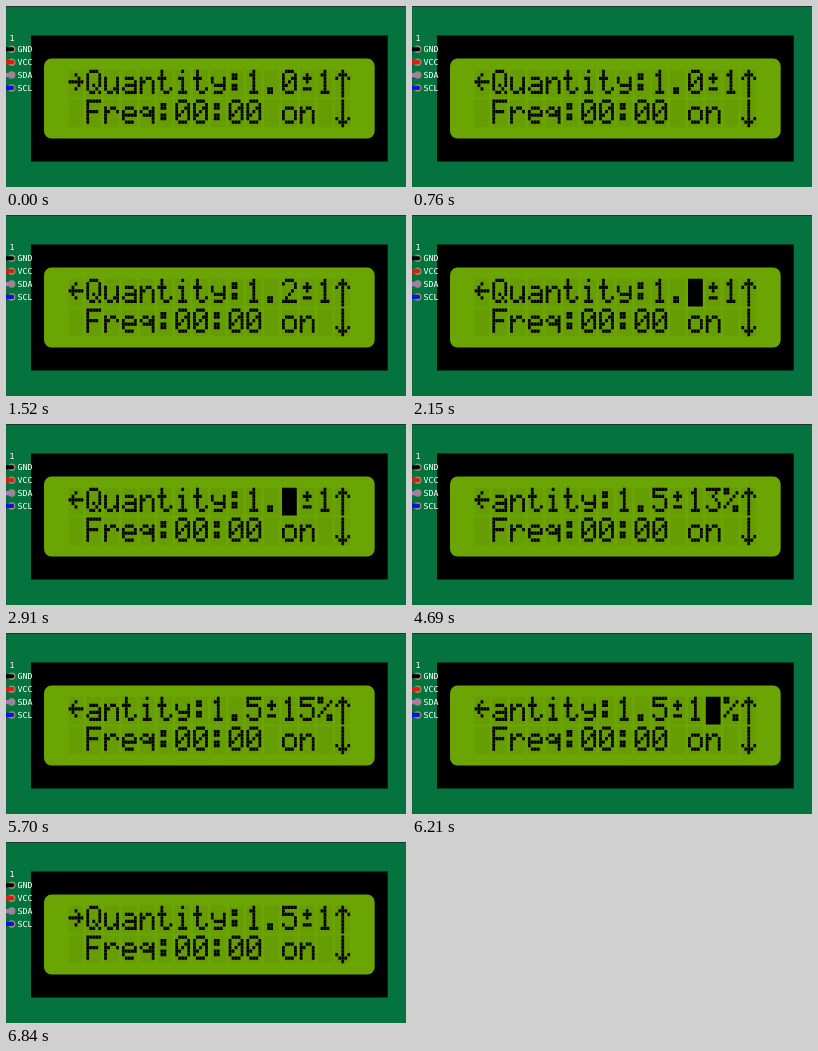
An HTML page with a canvas that plays this animation: 400x181 px, repeating every 6.97 s.

```html
<!DOCTYPE html>
<html>
<head>
<meta charset="utf-8">
<style>
  html, body { margin: 0; height: 100%; overflow: hidden; background: #1c3a2b; }
  canvas { display: block; }
</style>
</head>
<body>
<canvas id="stage" width="400" height="181"></canvas>
<script>
const ctx = document.getElementById('stage').getContext('2d');
const LOOP = 6970, STEP = LOOP / 55;

// Pen strokes on the 5x8 dot grid: each word is a polyline of xy pairs.
const STROKES = {
  Q: '2616050110304144 2446', u: '0205162635 4246', a: '1232434616051444',
  n: '0206 1322324346', t: '1015263645 0222', i: '20 122226 1636',
  y: '02031444 42453616', F: '400006 0333', r: '0206 13223243',
  e: '361605031232434404', q: '4246 332212031444', o: '120305163645433212',
  0: '160501103041453616 3214', 1: '112026 1636', 2: '01103041420646',
  3: '0040224445361605', 4: '3630030444', 5: '400002324345361605',
  ':': '11212212 14242515', '.': '15252616', '%': '00101101 4105 35454636',
  '±': '2123 1232 1535', '→': '0343 214325', '←': '0343 210325',
  '↑': '2027 022042', '↓': '2027 052745'
};

// Board geometry in millimetres.
const CELL_W = 3.55, CELL_H = 5.95, TEXT_X = 12.45, TEXT_Y = 12.55;

function box(color, x, y, w, h, radius = 0) {
  ctx.fillStyle = color;
  ctx.beginPath();
  ctx.roundRect(x, y, w, h, radius);
  ctx.fill();
}

function addGlyph(char, col, row) {
  const dot = (x, y) => ctx.rect(
    TEXT_X + col * CELL_W + x * 0.6, TEXT_Y + row * CELL_H + y * 0.7, 0.55, 0.65);
  for (const stroke of (STROKES[char] || '').split(' ').filter(Boolean)) {
    const points = stroke.match(/../g).map(p => [+p[0], +p[1]]);
    let [x, y] = points[0];
    dot(x, y);
    for (const [nx, ny] of points.slice(1)) {
      while (x !== nx || y !== ny) {
        x += Math.sign(nx - x);
        y += Math.sign(ny - y);
        dot(x, y);
      }
    }
  }
}

function drawPins() {
  ctx.font = '1.66px "DejaVu Sans Mono", monospace';
  ctx.fillStyle = '#fff';
  ctx.fillText('1', 0.65, 6.8);
  const wires = { GND: '#000', VCC: '#e01b10', SDA: '#a878b8', SCL: '#1010e0' };
  Object.entries(wires).forEach(([name, color], i) => {
    const y = 8.45 + i * 2.58;
    box('#92926d', 0.35, y - 0.75, 1.5, 1.5, 0.75);
    box(color, -1, y - 0.42, 2.6, 0.84, 0.42);
    ctx.fillStyle = '#fff';
    ctx.fillText(name, 2.25, y + 0.55);
  });
}

function drawBoard() {
  box('#05733e', 0, 0, 80, 36);
  box('#000', 4.95, 5.7, 71.2, 25.2);
  box('#6ba503', 7.55, 10.3, 66, 16, 1.5);
  for (let i = 0; i < 32; i++) {
    box('rgba(0,0,0,.05)', TEXT_X + i % 16 * CELL_W, TEXT_Y + (i >> 4) * CELL_H, 2.95, 5.55);
  }
  drawPins();
}

// Counts clicks of the knob, one every `gap` ms from `start`.
const clicks = (t, start, gap) => Math.max(0, Math.min(5, Math.floor((t - start) / gap) + 1));

function menuState(t) {
  const editing = t >= 620 && t < 6450;
  const onTolerance = editing && t >= 3200;
  const line = `Quantity:1.${clicks(t, 1000, 400)}±${10 + clicks(t, 3800, 400)}%`;
  const scroll = onTolerance ? 2 : 0;
  return {
    rows: [(editing ? '←' : '→') + line.slice(scroll, scroll + 14) + '↑', ' Freq:00:00 on ↓'],
    cursor: editing && (t + 710) % 820 < 410 ? (onTolerance ? 13 : 12) : -1
  };
}

function draw(now) {
  const t = Math.floor(now % LOOP / STEP + 0.05) * STEP;
  const { rows, cursor } = menuState(t);
  ctx.setTransform(1, 0, 0, 1, 0, 0);
  ctx.clearRect(0, 0, 400, 181);
  ctx.setTransform(5.01, 0, 0, 5, 0.2, 1);
  drawBoard();
  ctx.fillStyle = '#000';
  ctx.beginPath();
  rows.forEach((text, row) => [...text].forEach((char, col) => addGlyph(char, col, row)));
  if (cursor >= 0) ctx.rect(TEXT_X + cursor * CELL_W, TEXT_Y, 2.95, 5.55);
  ctx.fill();
  requestAnimationFrame(draw);
}
requestAnimationFrame(draw);
</script>
</body>
</html>
```
